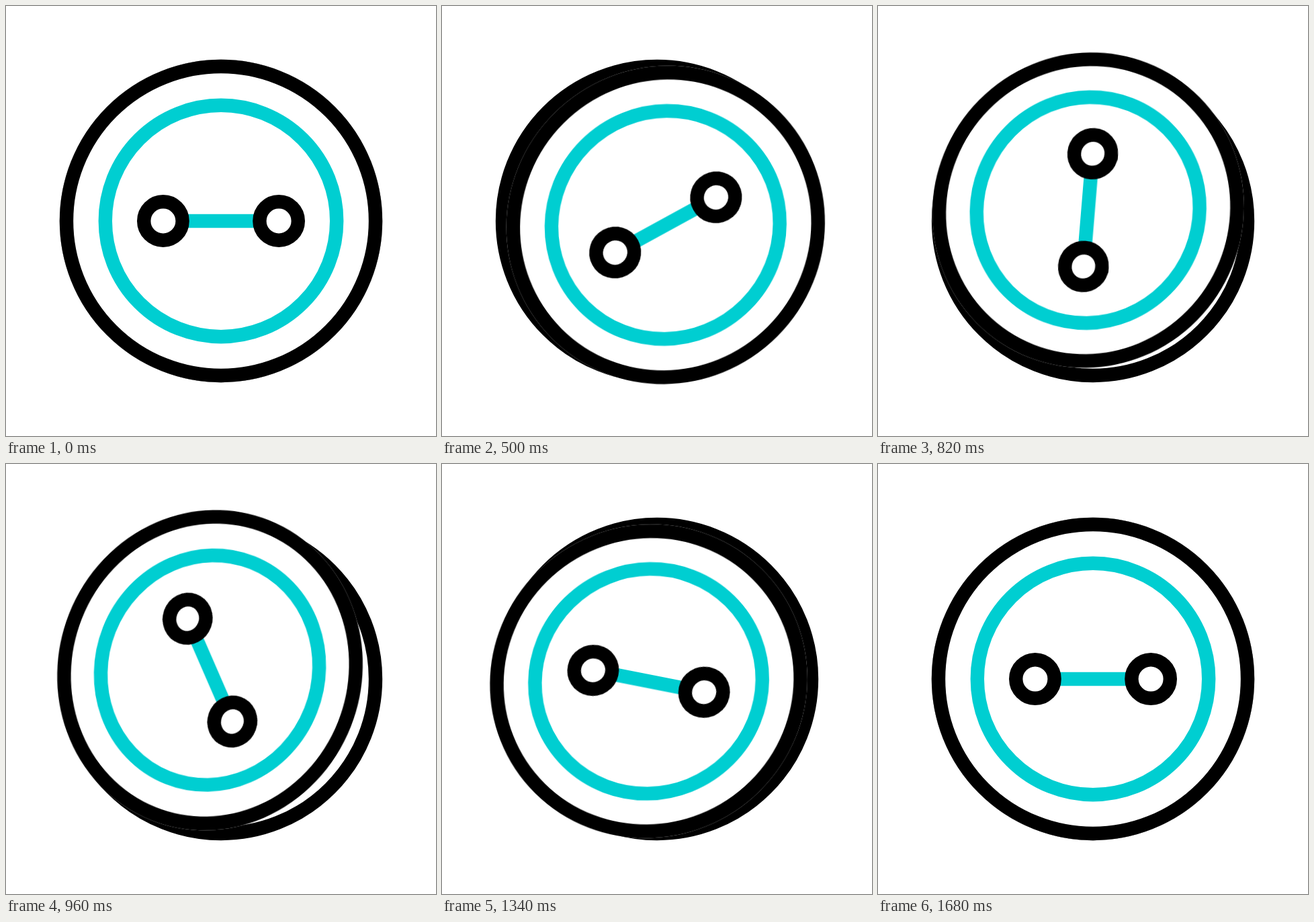
Write an HTML page without scripts that moves like this. It is 640 px wide and 640 px high and loops after 2400 ms.

```html
<!DOCTYPE html>
<html lang="en">
<head>
<meta charset="utf-8">
<title>Wobbling button</title>
<style>
  html, body { margin: 0; height: 100%; overflow: hidden; background: #fff; }
  svg { display: block; width: 100%; height: 100%; }

  circle, line { fill: none; stroke: #000; stroke-width: 20.4; vector-effect: non-scaling-stroke; }
  .base { fill: #fff; stroke: #fff; }
  .teal { stroke: #00ced1; }
  .hole { fill: #fff; }

  .sway, .bob, .tilt, .spin { animation: 2400ms linear infinite; }
  .sway { animation-name: sway; }
  .bob { animation-name: bob; }
  .tilt { animation-name: tilt; }
  .spin { animation-name: spin; }

  @keyframes sway {
    0% { transform: translateX(0); animation-timing-function: cubic-bezier(.5, 0, .5, 1); }
    20% { transform: translateX(12.9px); animation-timing-function: cubic-bezier(.5, 0, .5, 1); }
    44.583% { transform: translateX(-18.1px); animation-timing-function: cubic-bezier(.45, 0, .75, 1); }
    70%, 100% { transform: translateX(0); }
  }
  @keyframes bob {
    0% { transform: translateY(0); animation-timing-function: cubic-bezier(.5, 0, .5, 1); }
    18.333% { transform: translateY(6.8px); animation-timing-function: cubic-bezier(.5, 0, .5, 1); }
    34.167% { transform: translateY(-16.2px); animation-timing-function: cubic-bezier(.5, 0, .5, 1); }
    54.167% { transform: translateY(3.4px); animation-timing-function: cubic-bezier(.8, 0, 1, .2); }
    70%, 100% { transform: translateY(0); }
  }
  /* symmetric matrices: the disc leaning without turning */
  @keyframes tilt {
    0% { transform: matrix(1, 0, 0, 1, 0, 0); }
    6.667% { transform: matrix(.997, -.003, -.003, .9985, 0, 0); }
    13.333% { transform: matrix(.988, -.0115, -.0115, .994, 0, 0); }
    20% { transform: matrix(.987, -.01, -.01, .988, 0, 0); }
    28.333% { transform: matrix(.982, -.003, -.003, .966, 0, 0); }
    34.167% { transform: matrix(.964, -.012, -.012, .976, 0, 0); }
    40% { transform: matrix(.944, -.019, -.019, .992, 0, 0); }
    44.583% { transform: matrix(.946, -.004, -.004, .993, 0, 0); }
    49.167% { transform: matrix(.9565, .011, .011, .987, 0, 0); }
    55.833% { transform: matrix(.9825, -.0105, -.0105, .971, 0, 0); }
    62.5% { transform: matrix(.994, -.004, -.004, .989, 0, 0); }
    67.5% { transform: matrix(.999, 0, 0, .999, 0, 0); }
    70%, 100% { transform: matrix(1, 0, 0, 1, 0, 0); }
  }
  @keyframes spin {
    0% { transform: rotate(0deg); animation-timing-function: cubic-bezier(.5, 0, .5, 1); }
    70%, 100% { transform: rotate(-180deg); }
  }
</style>
</head>
<body>
<svg viewBox="0 0 640 640">
  <g transform="translate(320 320)">
    <circle r="230"/>
    <g class="sway"><g class="bob"><g class="tilt">
      <circle class="base" r="230"/>
      <circle r="230"/>
      <circle class="teal" r="172.2"/>
      <g class="spin">
        <line class="teal" x1="-60" x2="60"/>
        <circle class="hole" cx="-86.1" r="28.7"/>
        <circle class="hole" cx="86.1" r="28.7"/>
      </g>
    </g></g></g>
  </g>
</svg>
</body>
</html>
```
